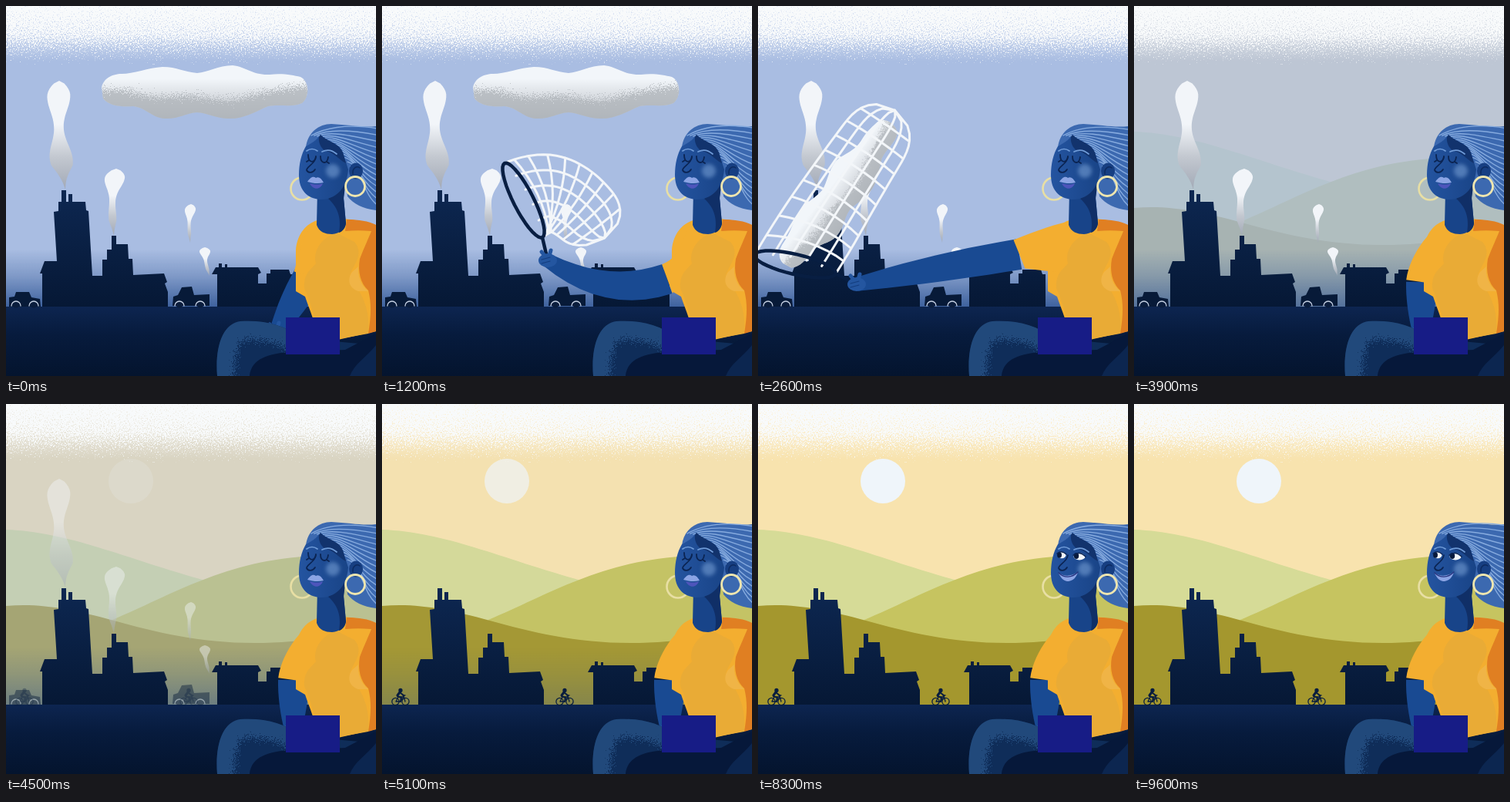
Animation of 480 by 480 pixels, one loop 10000 ms. Source, as an HTML page:

```html
<!DOCTYPE html>
<html lang="en">
<head>
<meta charset="utf-8">
<title>Catching the cloud</title>
<style>
html, body { margin: 0; width: 100%; height: 100%; overflow: hidden; background: #a9bde2; }
svg { display: block; width: 100vw; height: 100vh; }
.day, .haze, .sun, .fumes, .bikes, .open, .shut { animation: 10s linear infinite; }
.day { animation-name: day; }
.haze { animation-name: haze; }
.sun { animation-name: sun; }
.fumes { animation-name: fumes; }
.bikes { animation-name: bikes; }
.open { animation-name: open; }
.shut { animation-name: shut; }
@keyframes day { 0%, 34% { opacity: 0 } 39% { opacity: .26 } 51% { opacity: .96 } 54%, 100% { opacity: 1 } }
@keyframes haze { 0%, 34% { opacity: 1 } 58%, 100% { opacity: 0 } }
@keyframes sun { 0%, 43% { opacity: 0 } 51% { opacity: .7 } 56%, 100% { opacity: 1 } }
@keyframes fumes { 0%, 40% { opacity: 1 } 49%, 100% { opacity: 0 } }
@keyframes bikes { 0%, 43% { opacity: 0 } 49%, 100% { opacity: 1 } }
@keyframes open { 0%, 61% { opacity: 0 } 63%, 100% { opacity: 1 } }
@keyframes shut { 0%, 61% { opacity: 1 } 63%, 100% { opacity: 0 } }
</style>
</head>
<body>
<svg viewBox="0 0 480 480" preserveAspectRatio="none" fill="none" stroke-linecap="round" stroke-linejoin="round">
<defs>
  <filter id="spray" x="-20%" y="-20%" width="140%" height="140%" color-interpolation-filters="sRGB">
    <feTurbulence type="fractalNoise" baseFrequency=".85" numOctaves="2" seed="4"/>
    <feDisplacementMap in="SourceGraphic" scale="34" xChannelSelector="R" yChannelSelector="G"/>
  </filter>
  <!-- turns a soft alpha ramp into speckles -->
  <filter id="speckle" x="0" y="0" width="100%" height="100%" color-interpolation-filters="sRGB">
    <feTurbulence type="fractalNoise" baseFrequency=".6" numOctaves="2" seed="9"/>
    <feColorMatrix values="0 0 0 0 1  0 0 0 0 1  0 0 0 0 1  1.6 0 0 0 -.3"/>
    <feComposite in2="SourceGraphic" operator="arithmetic" k2="1" k3="1" k4="-.5"/>
    <feComponentTransfer result="dots"><feFuncA type="linear" slope="4" intercept="-1.5"/></feComponentTransfer>
    <feFlood flood-color="#f8fafb"/>
    <feComposite in2="dots" operator="in"/>
  </filter>
  <filter id="soft" x="-50%" y="-50%" width="200%" height="200%"><feGaussianBlur stdDeviation="2.5"/></filter>
  <linearGradient id="top" x2="0" y2="1">
    <stop stop-color="#fff" stop-opacity=".85"/><stop offset=".5" stop-color="#fff" stop-opacity=".6"/>
    <stop offset="1" stop-color="#fff" stop-opacity="0"/>
  </linearGradient>
  <linearGradient id="dusk" x2="0" y2="1">
    <stop stop-color="#284f90" stop-opacity="0"/><stop offset=".45" stop-color="#284f90" stop-opacity=".32"/>
    <stop offset="1" stop-color="#284f90" stop-opacity=".85"/>
  </linearGradient>
  <linearGradient id="wall" gradientUnits="userSpaceOnUse" x1="0" y1="240" x2="0" y2="390">
    <stop stop-color="#0d2751"/><stop offset="1" stop-color="#061835"/>
  </linearGradient>
  <linearGradient id="soil" x2="0" y2="1">
    <stop stop-color="#0d2550"/><stop offset=".4" stop-color="#071b3d"/><stop offset="1" stop-color="#04142e"/>
  </linearGradient>
  <linearGradient id="smoke" x2="0" y2="1">
    <stop offset=".4" stop-color="#f2f5f9"/><stop offset=".7" stop-color="#c3c8d0"/><stop offset="1" stop-color="#a2a9b6"/>
  </linearGradient>
  <linearGradient id="fluff" x2="0" y2="1">
    <stop offset=".25" stop-color="#f2f6fa"/><stop offset="1" stop-color="#b9bdc3"/>
  </linearGradient>
  <linearGradient id="skin" x2="1" y2="0">
    <stop stop-color="#2454a0"/><stop offset="1" stop-color="#194487"/>
  </linearGradient>
  <clipPath id="cloudClip"><use href="#cloudShape"/></clipPath>
  <clipPath id="legClip"><use href="#legShape"/></clipPath>
  <path id="cloudShape" d="M-134-5C-132-17-120-23-108-23C-93-23-73-31-55-32C-36-32-26-25-10-24C4-25 17-34 36-34C54-32 62-21 84-22C102-24 114-21 124-19C136-13 136 7 126 15C114 21 97 16 82 19C64 27 48 36 30 35C12 34 4 28-10 27C-26 28-34 36-53 35C-70 33-76 21-93 19C-108 20-124 19-132 9Z"/>
  <path id="legShape" d="M274 480C271 442 281 412 304 409C335 407 363 414 382 431L480 440V480Z"/>
</defs>

<rect width="480" height="480" fill="#a9bde2"/>
<g class="day">
  <rect width="480" height="400" fill="#f8e3ae"/>
  <path fill="#d6db97" d="M0 163C82 166 150 199 262 230L300 290H0Z"/>
  <path fill="#c6c460" d="M138 280C215 248 285 202 400 197H480V330H138Z"/>
  <path fill="#a4972e" d="M0 262C45 258 85 266 140 281C205 299 275 316 370 308L480 300V400H0Z"/>
</g>
<circle class="sun" cx="162" cy="100" r="29" fill="#eff5fa"/>
<rect class="haze" y="316" width="480" height="76" fill="url(#dusk)"/>
<rect width="480" height="72" fill="url(#top)" opacity=".7"/>
<rect width="480" height="76" fill="url(#top)" filter="url(#speckle)"/>

<g class="fumes" id="plumes" fill="url(#smoke)"></g>
<g fill="url(#wall)">
  <path d="M47 391V347H44L50 331H66L62 267L68 266V254H72V239H78V254H81V244H86V254H103L104 265L107 266L112 350H125V329H131V316H137V298H143V309H158L159 328H164L165 349L205 347L209 358L206 360L210 371V391Z"/>
  <path d="M274 391V348H267L272 339H276V334H280V339H284V335H287V339H327L331 346L327 348V360H338V347H343V342H367L369 348H373V391Z"/>
</g>
<rect y="390" width="480" height="90" fill="url(#soil)"/>
<g class="fumes" id="trucks"></g>
<g class="bikes" id="bikes"></g>

<g id="cloud">
  <use href="#cloudShape" fill="url(#fluff)"/>
  <g clip-path="url(#cloudClip)">
    <path filter="url(#spray)" fill="#aeb3b8" opacity=".75" d="M-140 0C-105-8-90 6-55 8C-20 2 0 8 30 12C70 4 90-4 140-8V50H-140Z"/>
  </g>
</g>
<path id="mesh" stroke="#f3f6f9" stroke-width="3"/>
<path id="hoop" stroke="#081e42" stroke-width="4.5"/>
<path id="arm" fill="#194a92"/>
<g id="hand" fill="#2456a0">
  <ellipse rx="12" ry="9"/>
  <path stroke="#2456a0" stroke-width="5" d="M-3-5L-8-11M2-6L4-13"/>
  <path stroke="#143d7e" stroke-width="1.2" d="M-8-1L3-4M-8 4L3 1"/>
</g>

<use href="#legShape" fill="#0f2d59"/>
<g clip-path="url(#legClip)">
  <path filter="url(#spray)" stroke="#21497b" stroke-width="40" d="M276 500C274 445 284 417 306 413C335 411 358 417 378 430"/>
</g>
<path fill="#06183a" d="M316 480C318 458 340 450 372 449L440 446L480 425V480Z"/>
<path fill="#0c2650" d="M446 480C452 464 466 457 480 440V480Z"/>

<path fill="#f3ae30" d="M404 278C390 282 378 295 376 316V370L388 377C394 395 402 413 408 438L480 422V284C465 279 450 277 438 276Z"/>
<path id="sleeve" fill="#f3ae30"/>
<path fill="#e9ab36" d="M428 294C408 302 398 318 402 334C396 342 386 346 387 366C394 382 400 400 409 436L470 425C473 395 462 370 446 355C444 340 468 325 452 306Z"/>
<path fill="#e07f22" d="M442 277C458 277 470 279 480 284V422L470 425C474 400 474 385 470 369C460 360 456 345 459 328C464 315 470 302 474 292C462 291 451 291 440 292Z"/>
<path fill="#f0b446" d="M449 345C442 355 445 366 457 370H470C460 362 456 350 457 338Z"/>

<circle cx="384" cy="237" r="14.5" stroke="#e8dfa4" stroke-width="2.6"/>
<path fill="#3c69b0" d="M389 184C391 164 406 153 422 153C445 154 462 158 480 156V265C463 263 451 257 443 247L440 210L405 172Z"/>
<g id="hair" stroke="#86abdf" stroke-width="1.4"></g>
<path fill="#184489" d="M404 240L403 284C406 293 414 296 423 296C433 295 440 290 441 282L438 248L441 222Z"/>
<path fill="#102f67" d="M418 250L441 225L438 250L441 282C440 289 436 293 432 294C435 278 432 262 418 250Z"/>
<path fill="url(#skin)" d="M389 182C397 178 404 173 408 167C416 176 432 177 437 190L444 212C442 238 427 251 408 251C390 250 380 238 380 219C380 205 383 192 389 182Z"/>
<path fill="#12336d" d="M408 167C416 176 432 177 437 190L441 204C431 199 425 189 414 188C408 184 405 176 406 170Z"/>
<ellipse cx="454" cy="214" rx="9" ry="10.5" fill="#173f82"/>
<path stroke="#0d2b60" stroke-width="1.5" d="M450 218C449 210 455 207 459 210"/>
<circle cx="424" cy="214" r="9" fill="#6d96cd" opacity=".65" filter="url(#soft)"/>
<path stroke="#6f9bd8" stroke-width="1.7" d="M390 188Q397 183 404 188M410 189Q420 184 429 192"/>
<path stroke="#0b2452" stroke-width="1.7" d="M402 196C401 205 390 208 390 213C392 217 398 217 401 212"/>
<g class="shut">
  <path stroke="#0b2452" stroke-width="1.8" d="M392 193C392 204 401 205 402 195M408 195C408 205 417 206 418 196M393 200L390 202M416 202L419 204"/>
  <path fill="#8ba4e4" d="M391 228C396 221 399 221 402 223C406 221 409 224 412 229C405 231 398 230 391 228Z"/>
  <path fill="#4d55bb" d="M394 230C401 232 406 232 411 230C408 239 398 239 394 230Z"/>
</g>
<g class="open">
  <ellipse cx="394" cy="196" rx="5.5" ry="4.2" fill="#f1f5f9"/>
  <ellipse cx="417" cy="198" rx="7.5" ry="4.4" fill="#f1f5f9"/>
  <ellipse cx="391" cy="196" rx="3" ry="3.7" fill="#071a3c"/>
  <ellipse cx="413" cy="197" rx="3.2" ry="3.9" fill="#071a3c"/>
  <path stroke="#0b2452" stroke-width="1.5" d="M388 194Q394 189 400 195M409 196Q417 190 425 198"/>
  <path fill="#8ba4e4" d="M390 219C397 224 406 224 415 218C412 228 406 230 401 230C396 229 392 225 390 219Z"/>
  <path stroke="#27347f" stroke-width="1.3" d="M390 219C397 226 407 226 415 218"/>
</g>
<circle cx="453" cy="234" r="12.5" stroke="#efe6af" stroke-width="2.8"/>

<rect x="363" y="404" width="70" height="48" fill="#171c86"/>
</svg>

<script>
const LOOP = 10000;
const $ = id => document.getElementById(id);
const f = v => v.toFixed(1);
const mix = (a, b, k) => a + (b - a) * k;
const polar = (angle, r = 1) => [r * Math.cos(angle * Math.PI / 180), r * Math.sin(angle * Math.PI / 180)];
const unit = (x, y) => { const l = Math.hypot(x, y) || 1; return [x / l, y / l]; };
const steps = (n, fn) => Array.from({ length: n + 1 }, (_, i) => fn(i / n));
const line = points => 'M' + points.map(([x, y]) => f(x) + ' ' + f(y)).join('L');
const ease = (t, from, to) => {
  const k = Math.min(1, Math.max(0, (t - from) / (to - from)));
  return k * k * (3 - 2 * k);
};

// Cuff: sleeve end and its angle. Tilt: net handle angle. Bag: direction, length and bend of the net.
const ready = { cuffX: 393, cuffY: 350, cuff: 106, handX: 350, handY: 424, sag: 0, tilt: -90, bag: 90, length: 110, bend: 0 };
const reach = { cuffX: 370, cuffY: 354, cuff: 160, handX: 215, handY: 330, sag: 38, tilt: 68, bag: 25, length: 116, bend: -56 };
const hold = { cuffX: 339, cuffY: 322, cuff: 158, handX: 128, handY: 361, sag: -2, tilt: 18, bag: -57, length: 238, bend: -6 };
const rest = { ...ready, cuffX: 373, cuffY: 358, cuff: 98, handX: 372, handY: 430, length: 240 };

const blend = (a, b, k) => Object.fromEntries(Object.keys(a).map(key => [key, mix(a[key], b[key], k)]));

function poseAt(t) {
  if (t < 1200) return blend(ready, reach, ease(t, 0, 1200));
  if (t > 2700) return blend(hold, rest, ease(t, 2700, 3600));
  const k = ease(t, 1200, 2400), arc = Math.sin(Math.PI * k), p = blend(reach, hold, k);
  p.handX += 70 * arc;
  p.handY -= 105 * arc;
  p.tilt += 45 * arc;
  p.bag += 15 * arc;
  p.cuffY -= 18 * arc;
  return p;
}

// point and tangent on a quadratic curve
function quad([x0, y0], [x1, y1], [x2, y2], s) {
  const at = (a, b, c) => mix(mix(a, b, s), mix(b, c, s), s);
  const slope = (a, b, c) => mix(b - a, c - b, s);
  return [at(x0, x1, x2), at(y0, y1, y2), ...unit(slope(x0, x1, x2), slope(y0, y1, y2))];
}

function drawArm(p) {
  const [dx, dy] = polar(p.cuff), { cuffX: x, cuffY: y } = p;
  const ax = x - dy * 20, ay = y + dx * 20;
  $('sleeve').setAttribute('d', `M412 278C388 282 ${f(ax - dx * 35)} ${f(ay - dy * 35)} ${f(ax)} ${f(ay)}L${f(x + dy * 20)} ${f(y - dx * 20)}L394 346L430 330Z`);
  const elbow = [(x + p.handX) / 2, (y + p.handY) / 2 + p.sag];
  const edge = side => steps(10, s => {
    const [cx, cy, tx, ty] = quad([x, y], elbow, [p.handX, p.handY], s), w = side * mix(20, 9, s * s);
    return [cx - ty * w, cy + tx * w];
  });
  $('arm').setAttribute('d', line([...edge(1), ...edge(-1).reverse()]) + 'Z');
  $('hand').setAttribute('transform', `translate(${f(p.handX)} ${f(p.handY)})`);
}

function drawNet(p) {
  const size = 54, [hx, hy] = polar(p.tilt, 84), [ux, uy] = polar(p.tilt - 5), [bx, by] = polar(p.bag, p.length);
  const cx = p.handX - hx, cy = p.handY - hy;
  const spine = s => quad([cx, cy], [cx + bx / 2, cy + by / 2 + p.bend], [cx + bx, cy + by], s);
  const at = (s, u) => {
    const [x, y, dx, dy] = spine(s), side = dx * uy < dy * ux ? -1 : 1, k = Math.min(1, s * 3);
    const [nx, ny] = unit(mix(ux, -dy * side, k), mix(uy, dx * side, k));
    const cap = Math.sqrt(1 - Math.max(0, (s - .75) / .25) ** 3);
    const w = size * mix(1, .78, s) * cap * u, bulge = 9 * (1 - u * u) * (1 - s);
    return [x + nx * w + dx * bulge, y + ny * w + dy * bulge];
  };
  let d = '';
  for (let u = -1; u < 1.1; u += .4) d += line(steps(32, s => at(s, u)));
  for (let i = 1; i < 10; i++) d += line(steps(8, k => at(i / 10, k * 2 - 1)));
  $('mesh').setAttribute('d', d);
  const ring = steps(36, k => {
    const [a, b] = polar(k * 360);
    return [cx + ux * size * a - uy * 13 * b, cy + uy * size * a + ux * 13 * b];
  });
  $('hoop').setAttribute('d', line([...ring, [p.handX, p.handY]]));
  return spine(.44);
}

function drawCloud(t, p, [x, y]) {
  const k = ease(t, 1700, 2400);
  $('cloud').setAttribute('transform',
    `translate(${f(mix(258 - t / 200, x, k))} ${f(mix(111, y, k))}) rotate(${f(mix(0, p.bag + 4, k))}) scale(${mix(1, .86, k).toFixed(3)})`);
}

const strands = steps(13, k => {
  const path = document.createElementNS('http://www.w3.org/2000/svg', 'path');
  $('hair').append(path);
  return { path, k };
});
function drawHair(t) {
  for (const { path, k } of strands) {
    const sway = 1.5 * Math.sin(t * Math.PI / 1000 + k * 6), x = mix(396, 447, k), y = 168 + 40 * k * k;
    path.setAttribute('d', `M${f(x)} ${f(y)}C${f(x + 16)} ${f(y - 9 + 14 * k)} ${f(mix(440, 462, k))} ${f(mix(152, 243, k) + sway)} 482 ${f(mix(159, 259, k) + sway)}`);
  }
}

// a round head, a waist and a lower swelling that tapers to the chimney
function plume(tipX, tipY, headX, headY, width, swell) {
  const bump = (s, mid) => Math.exp(-(((s - mid) / .2) ** 2));
  const edge = side => steps(40, s => {
    const cap = Math.sqrt(1 - Math.max(0, (s - .86) / .14) ** 2);
    const w = width * (.3 + bump(s, .86) + swell * bump(s, .28)) * Math.min(1, s / .22) * cap;
    const lean = -width * .35 * Math.sin(s * Math.PI);
    return [mix(tipX, headX, s) + lean + side * w, mix(tipY, headY, s)];
  });
  return `<path d="${line([...edge(-1), ...edge(1).reverse()])}Z"/>`;
}
$('plumes').innerHTML = plume(77, 238, 69, 97, 11.5, 1) + plume(140, 298, 143, 211, 10, .2) +
  plume(239, 307, 240, 257, 5.4, .1) + plume(264, 350, 258, 313, 5.4, .1);

const wheel = x => `<circle cx="${x}" cy="387" r="4.5" fill="#0a1d3d"/><path stroke="#c6d1e4" stroke-width="1.3" d="M${x - 6} 389A6 6 0 1 1 ${x + 6} 389"/>`;
const truck = (x, body, rear) => `<g transform="translate(${x})"><path fill="#071a38" d="${body}"/>${wheel(9)}${wheel(rear)}</g>`;
$('trucks').innerHTML =
  truck(4, 'M0 390V378L7 377L9 371H26L29 378L40 380L41 390Z', 32) +
  truck(216, 'M0 389L1 377L7 375L12 365L25 364L28 375L48 374V389Z', 36);

const bike = x => `<g transform="translate(${x} 386)" stroke="#081d3e" stroke-width="1.3">
  <circle cx="-6.500" r="4.600"/><circle cx="6.500" r="4.600"/><path d="M-6 0L-3-6L4-6L0 0ZM4-8L6 0M3-8H6"/>
  <path stroke-width="3" d="M-4-8L-1-12"/><path stroke-width="2" d="M-1-12L4-8M-4-7L1-5L0 0"/>
  <circle cy="-14.500" r="2" fill="#081d3e"/></g>`;
$('bikes').innerHTML = bike(24) + bike(237);

let start;
function frame(now) {
  start ??= now;
  const t = Math.floor((now - start) % LOOP / 100) * 100, pose = poseAt(t);
  drawArm(pose);
  drawCloud(t, pose, drawNet(pose));
  drawHair(t);
  requestAnimationFrame(frame);
}
requestAnimationFrame(frame);
</script>
</body>
</html>
```
